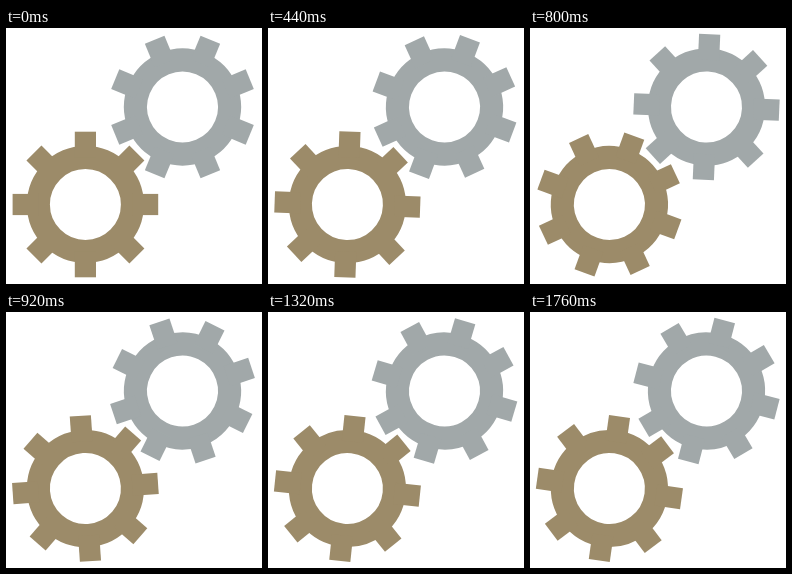
An HTML page for the animation above (1800 ms loop, 256 by 256 pixels).

```html
<!DOCTYPE html>
<html lang="en">
<head>
<meta charset="utf-8">
<title>Gears</title>
<style>
  html, body { margin: 0; width: 100%; height: 100%; overflow: hidden; background: #fff; }
  svg { display: block; width: 100vw; height: 100vh; }
</style>
</head>
<body>
<svg id="stage" viewBox="0 0 256 256"></svg>
<script>
const LOOP = 1800, STEP = 40;
const TEETH = 8, TIP = 72.8, RIM = 58.5, HOLE = 35.5, TOOTH = 21.2;
const stage = document.getElementById('stage');

function add(parent, tag, attrs) {
  const node = document.createElementNS('http://www.w3.org/2000/svg', tag);
  for (const key in attrs) node.setAttribute(key, attrs[key]);
  return parent.appendChild(node);
}

function makeGear(x, y, color, phase, direction) {
  const node = add(stage, 'g', { fill: color });
  const ring = (RIM + HOLE) / 2;
  add(node, 'circle', { r: ring, fill: 'none', stroke: color, 'stroke-width': RIM - HOLE });
  for (let i = 0; i < TEETH; i++) {
    add(node, 'rect', {
      x: -TOOTH / 2, y: -TIP, width: TOOTH, height: TIP - ring,
      transform: `rotate(${i * 360 / TEETH})`
    });
  }
  return turn => node.setAttribute('transform',
    `translate(${x} ${y}) rotate(${phase + direction * turn})`);
}

const gears = [
  makeGear(176.5, 79, '#a1a8a9', 22.5, 1),
  makeGear(79.4, 176.5, '#9c8b69', 0, -1)
];

function render(ms) {
  // Small slack keeps clock rounding from delaying a step
  const tick = Math.floor((ms + 1) / STEP) * STEP;
  const turn = (tick % LOOP) / LOOP * 360;
  gears.forEach(rotate => rotate(turn));
}

const start = performance.now();
function loop() {
  render(performance.now() - start);
  requestAnimationFrame(loop);
}
loop();
</script>
</body>
</html>
```
